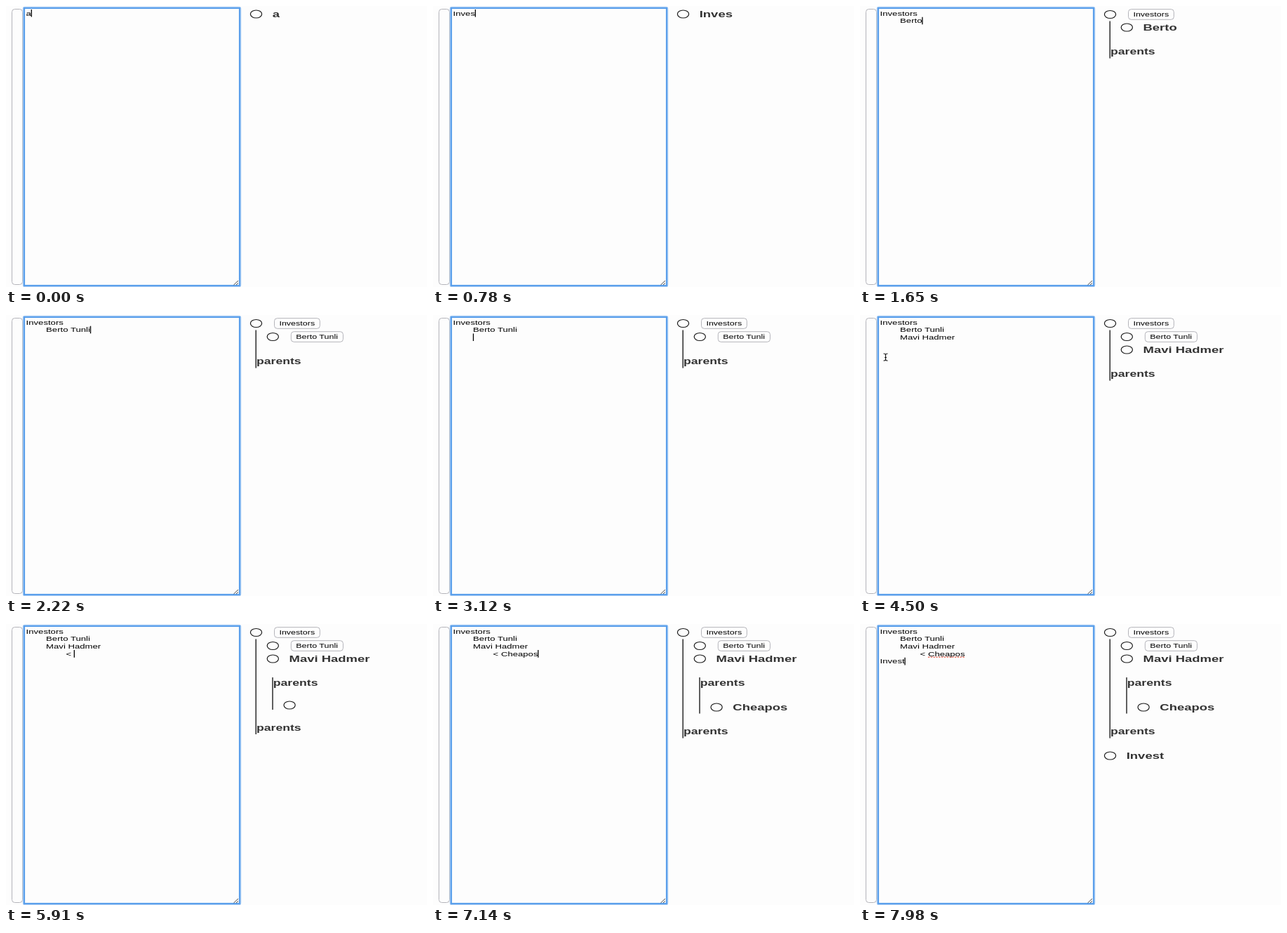
These frames come from a looping animation (600 px wide and 400 px high, 8 s). An HTML page:

```html
<!DOCTYPE html>
<html lang="en">
<head>
<meta charset="utf-8">
<title>Outline editor</title>
<style>
  html, body { margin: 0; width: 100%; height: 100%; overflow: hidden; background: #fdfdfd; }
  svg { display: block; width: 600px; height: 400px; }
  text { font-family: "Liberation Sans", Arial, sans-serif; white-space: pre; fill: #000; }
  .bold { font-weight: bold; fill: #333; }
  .ink { fill: none; stroke: #1c1c1c; }
  .soft { fill: none; stroke: #b4b4ba; }
</style>
</head>
<body>
<svg viewBox="0 0 600 400">
  <rect class="soft" x="8.5" y="4.5" width="15" height="392" rx="4"/>
  <rect x="25.5" y="2.5" width="308" height="396" rx="1.5" fill="none" stroke="#b4d3f6" stroke-width="3.6"/>
  <rect x="26" y="3" width="307" height="395" fill="#fdfdfd" stroke="#5a9feb" stroke-width="2.2"/>
  <path d="M324.5 397L331 391M328 397L331 394.3" class="ink" stroke-width=".8"/>
  <g id="page"></g>
  <path id="mouse" class="ink" stroke-width="1.2" d="M33.5 55q3 0 3 1.5q0-1.5 3-1.5M36.5 56.5V63.5M33.5 65q3 0 3-1.5q0 1.5 3 1.5M35 60.5h3"/>
  <path id="caret" stroke="#000" stroke-width="1.3"/>
</svg>
<script>
const LOOP = 8000;
const WIDE = 1.4;            // the whole page is stretched sideways
const STEP = 23.8;           // tree indent
const TAB = 28.5;
const KNOWN = new Set(['Investors', 'Berto Tunli']);
const EDIT = 9.38, CHIP = 8.95, LABEL = 13.2, HEAD = 12.6;

// Keystrokes: a string is typed one character per listed time.
const keys = [[0, 'a'], [150, '\b']];
const type = (word, ...times) => times.forEach((t, i) => keys.push([t, word[i]]));
type('Investors', 300, 420, 540, 660, 780, 870, 990, 1080, 1230);
keys.push([1380, '\n'], [1440, '\t']);
type('Berto Tunli', 1500, 1530, 1560, 1620, 1650, 1770, 1860, 1950, 2040, 2130, 2190);
keys.push([2700, '\n\t']);
type('Mavi Hadmer', 3240, 3330, 3390, 3480, 3540, 3630, 3690, 3780, 3840, 3930, 3990);
keys.push([4740, '\n\t'], [4890, '\t']);
type('< Cheapos', 5160, 5500, 6270, 6420, 6570, 6720, 6900, 7050, 7140);
keys.push([7230, '\n\t\t'], [7300, '\b'], [7350, '\b']);
type('Invest', 7440, 7560, 7650, 7740, 7830, 7920);

const page = document.getElementById('page');
const caret = document.getElementById('caret');
const mouse = document.getElementById('mouse');
const ctx = document.createElement('canvas').getContext('2d');
ctx.font = '100px "Liberation Sans", Arial, sans-serif';
const widthOf = (s, size) => ctx.measureText(s).width / 100 * size * WIDE;

function add(tag, attrs, content) {
  const el = document.createElementNS('http://www.w3.org/2000/svg', tag);
  for (const k in attrs) el.setAttribute(k, attrs[k]);
  if (content) el.textContent = content;
  page.append(el);
}
const write = (s, x, y, size, cls = '') =>
  add('text', { transform: `translate(${x} ${y}) scale(${WIDE} 1)`, 'font-size': size, class: cls }, s);

function parse(lines) {
  const root = { kids: [], parents: [] };
  const stack = [root];
  for (const line of lines) {
    const body = line.trim();
    if (!body) continue;
    const depth = line.match(/^\t*/)[0].length;
    const up = body[0] === '<';
    const node = { name: up ? body.slice(1).trim() : body, kids: [], parents: [] };
    const owner = stack[Math.min(depth, stack.length - 1)];
    (up ? owner.parents : owner.kids).push(node);
    stack.length = Math.min(depth + 1, stack.length);
    stack.push(node);
  }
  return root;
}

// Draws a node with its top at y and returns the y below it.
function drawNode(node, x, y) {
  const chip = KNOWN.has(node.name);
  const cy = y + (chip ? 9.5 : node.name ? 9 : 6);
  add('ellipse', { cx: x, cy, rx: 8.1, ry: 5.5, class: 'ink', 'stroke-width': 1.2 });
  if (chip) {
    add('rect', { x: x + 26, y: cy - 7.3, width: widthOf(node.name, CHIP) + 14, height: 14.6, rx: 4, class: 'soft' });
    write(node.name, x + 32.9, cy + 3.1, CHIP);
  } else if (node.name) {
    write(node.name, x + 23.2, cy + 4.6, LABEL, 'bold');
  }
  y += chip ? 19 : node.name ? 18 : 12.5;
  if (!node.kids.length && !node.parents.length) return y;

  const top = y;
  for (const kid of node.kids) y = drawNode(kid, x + STEP, y);
  const base = y + 30;
  write('parents', x + .5, base - .4, HEAD, 'bold');
  let end = base + 5;
  y = base + 21;
  for (const parent of node.parents) end = y = drawNode(parent, x + STEP, y);
  const start = node.kids.length ? top : base - 12.5;
  add('path', { d: `M${x - .3} ${start}V${end}`, class: 'ink', 'stroke-width': 1.4 });
  return node.parents.length ? end : y;
}

function drawEditor(lines) {
  let x, y;
  lines.forEach((line, i) => {
    const body = line.replace(/^\t+/, '');
    x = 28.6 + (line.length - body.length) * TAB;
    y = 13.6 + i * 10.7;
    if (body) write(body, x, y, EDIT);
    if (body === '< Cheapos' && i < lines.length - 1) {
      const from = x + widthOf('< ', EDIT);
      add('path', { d: `M${from} ${y + 1.6}H${x + widthOf(body, EDIT)}`, stroke: '#ee7868',
        'stroke-width': 1.5, 'stroke-dasharray': '2.4 1.4' });
    }
    x += widthOf(body, EDIT);
  });
  caret.setAttribute('d', `M${x + .4} ${y - 8.6}v10.6`);
}

function render(count) {
  let text = '';
  for (const [, s] of keys.slice(0, count)) text = s === '\b' ? text.slice(0, -1) : text + s;
  const lines = text.split('\n');
  page.replaceChildren();
  drawEditor(lines);
  let y = 2.5;
  for (const node of parse(lines).kids) y = drawNode(node, 356.5, y);
}

let shown = -1;
const begin = performance.now();
function tick() {
  const t = (performance.now() - begin) % LOOP;
  const count = keys.filter(k => k[0] <= t).length;
  if (count !== shown) render(shown = count);
  const idle = t - keys[count - 1][0];
  caret.style.display = idle % 1000 < 500 ? '' : 'none';
  mouse.style.display = t >= 4200 && t < 4740 ? '' : 'none';
  requestAnimationFrame(tick);
}
tick();
</script>
</body>
</html>
```
